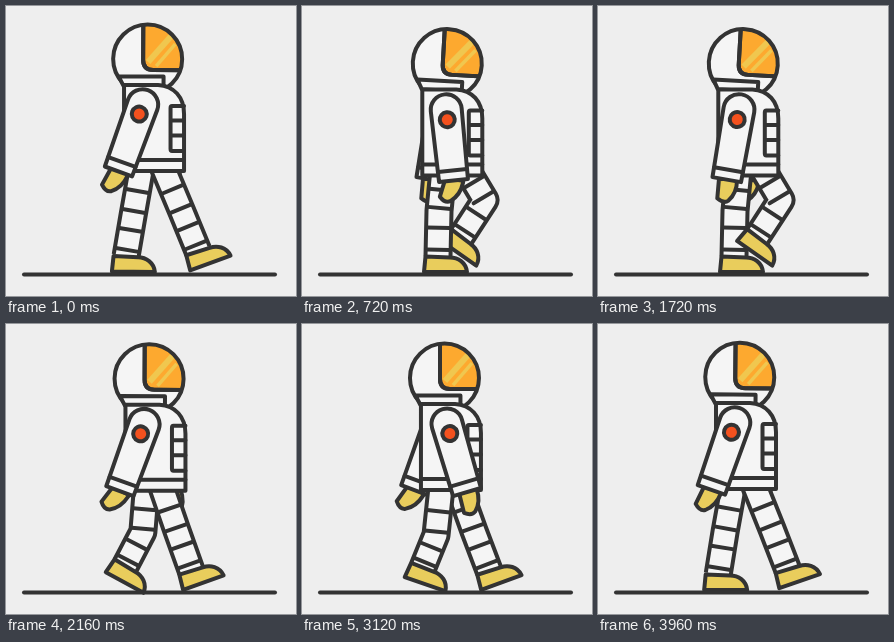
Write an HTML page that moves like this. It is 290x290 px and loops after 4000 ms.

```html
<!DOCTYPE html>
<html lang="en">
<head>
<meta charset="utf-8">
<title>Walking astronaut</title>
<style>
  html, body { margin: 0; width: 100%; height: 100%; overflow: hidden; background: #eee; }
  svg { display: block; width: 100vw; height: 100vh; }
  .line { fill: none; stroke: #333; stroke-width: 4; stroke-linecap: round; stroke-linejoin: round; }
  .suit { fill: #f5f5f5; }
  .yellow { fill: #e9cd5c; }
  .limb { fill: none; stroke-linejoin: round; }
</style>
</head>
<body>
<svg viewBox="0 0 290 290">
  <defs>
    <clipPath id="helmet"><circle cx="141.5" cy="53" r="34.5"/></clipPath>
    <clipPath id="visor"><path d="M137 10H190V64H147Q137 64 137 54Z"/></clipPath>
  </defs>
  <g id="farArm"></g>
  <g id="farLeg"></g>
  <g id="nearLeg"></g>
  <g id="head">
    <circle class="suit" cx="141.5" cy="53" r="34.5"/>
    <g clip-path="url(#helmet)">
      <path class="line" style="fill:#fda92f" d="M137 10H190V64H147Q137 64 137 54Z"/>
      <g clip-path="url(#visor)" fill="none" stroke="#f0c74f">
        <path stroke-width="6" d="M142 56L165 30"/>
        <path stroke-width="3.5" d="M150 60L169 38"/>
      </g>
      <path class="line" d="M137 10V54Q137 64 147 64H190"/>
    </g>
    <circle class="line" cx="141.5" cy="53" r="34.5"/>
    <path class="line suit" d="M112.5 70.5H157.5V80H117.5Z"/>
  </g>
  <g id="body">
    <path class="line suit" d="M118 79H152C168 80 178 91 178 108V165H118Z"/>
    <path class="line" d="M118 154H178M178 100H166Q164.500 100 164.500 102V143Q164.500 145 166 145H178M164.500 114.500H178M164.500 129.500H178"/>
  </g>
  <g id="nearArm"></g>
  <path class="line" d="M18 268.500H269"/>
</svg>
<script>
const LOOP = 4000, STEP = 40, STRIDE = 2000;
const SHOULDER = [140.7, 87.4], HIP = [142, 125];

// time, knee x, knee y, ankle x, ankle y, foot angle
const GAIT = [
  [0, 176, 206, 192, 245, -20],
  [120, 172, 207, 187, 246.5, -20],
  [200, 170, 207, 183, 246.5, -17],
  [330, 165, 208, 175, 250, 0],
  [560, 148, 207, 151.5, 250.5, 0],
  [720, 137, 205, 136, 250.5, 0],
  [980, 127, 208, 120, 250.5, 0],
  [1120, 134, 211, 121, 243, 19],
  [1200, 140, 204, 118, 239.4, 38],
  [1380, 153, 198, 119, 227, 58],
  [1560, 167, 195, 133.6, 225.7, 58],
  [1720, 183, 194, 159.4, 230.3, 35],
  [1850, 183, 199, 184, 240, 3],
  [1960, 174, 205, 189.5, 245, -19]
];

const byId = id => document.getElementById(id);
const wave = turns => Math.cos(2 * Math.PI * turns);
const mix = (a, b, k) => [a[0] + (b[0] - a[0]) * k, a[1] + (b[1] - a[1]) * k];

function gaitKey(i) {
  const n = GAIT.length, lap = Math.floor(i / n);
  const [time, ...pose] = GAIT[i - lap * n];
  return { time: time + lap * STRIDE, pose };
}

// Smooth cyclic interpolation that holds still at turning points.
function gaitAt(time) {
  const t = time % STRIDE;
  const i = GAIT.findLastIndex(key => key[0] <= t);
  const [a, b, c, d] = [-1, 0, 1, 2].map(k => gaitKey(i + k));
  const span = c.time - b.time, u = (t - b.time) / span;
  const tangent = (p, q, r, j) => {
    const before = q.pose[j] - p.pose[j], after = r.pose[j] - q.pose[j];
    return before * after <= 0 ? 0 : (before + after) / (r.time - p.time) * span;
  };
  return b.pose.map((from, j) => {
    const to = c.pose[j];
    const blend = u * u * (3 - 2 * u);
    return from + (to - from) * blend
      + tangent(a, b, c, j) * u * (1 - u) * (1 - u)
      - tangent(b, c, d, j) * u * u * (1 - u);
  });
}

function makeArm(id, badge) {
  const arm = byId(id);
  arm.innerHTML = `
    <path class="line yellow" d="M-8 0L-11 19Q-5 25 0 22Q9 15 10 2V0Z"/>
    <path class="line suit" d="M-15.5 12A15.5 15.5 0 0 1 15.5 12L14.500 83H-14.500Z"/>
    <path class="line" d="M-14.500 73H14.500"/>
    ${badge ? '<circle class="line" style="fill:#f4511e" cy="22" r="7.500"/>' : ''}`;
  const hand = arm.firstElementChild;
  return (time, dx, dy) => {
    const turns = time / STRIDE;
    const swing = -2 - 18.5 * wave(turns - 0.04);
    const wrist = -18 * wave(turns - 0.25);
    arm.setAttribute('transform',
      `translate(${SHOULDER[0] + dx} ${SHOULDER[1] + dy}) rotate(${-swing})`);
    hand.setAttribute('transform', `translate(0 82) rotate(${-wrist})`);
  };
}

function band(from, to, k) {
  const [x, y] = mix(from, to, k);
  const dx = to[0] - from[0], dy = to[1] - from[1];
  const s = 11.5 / Math.hypot(dx, dy);
  return `M${x - dy * s} ${y + dx * s}L${x + dy * s} ${y - dx * s}`;
}

function makeLeg(id) {
  const leg = byId(id);
  leg.innerHTML = `
    <path class="limb" stroke="#333" stroke-width="29"/>
    <path class="limb" stroke="#f5f5f5" stroke-width="21"/>
    <path class="line"/>
    <path class="line yellow" d="M-12.500 0L-14 15.500H29C28 6 20 1 12 1Z"/>`;
  const [outline, fill, bands, boot] = leg.children;
  return (time, dx, dy) => {
    const [kx, ky, ax, ay, angle] = gaitAt(time);
    const hip = [HIP[0] + dx, HIP[1] + dy], knee = [kx, ky], ankle = [ax, ay];
    const path = `M${hip}L${knee}L${ankle}`;
    outline.setAttribute('d', path);
    fill.setAttribute('d', path);
    bands.setAttribute('d', band(knee, hip, 0.28) + band(knee, hip, 0.04)
      + band(knee, ankle, 0.37) + band(knee, ankle, 0.85));
    boot.setAttribute('transform', `translate(${ankle}) rotate(${angle})`);
  };
}

const near = [makeArm('nearArm', true), makeLeg('nearLeg')];
const far = [makeArm('farArm', false), makeLeg('farLeg')];

function draw(elapsed) {
  const time = Math.floor(elapsed % LOOP / STEP) * STEP;
  const step = time / (STRIDE / 2);
  const dx = 2.3 * (1 - wave(step + 0.03));
  const dy = 3.75 * (1 - wave(step));
  const nod = 2 * (1 - wave(step - 0.08));
  byId('body').setAttribute('transform', `translate(${dx} ${dy})`);
  byId('head').setAttribute('transform', `translate(${dx} ${dy}) rotate(${nod} 140 79)`);
  near.forEach(pose => pose(time, dx, dy));
  far.forEach(pose => pose(time + STRIDE / 2, dx, dy));
}

const start = performance.now();
function tick() {
  draw(performance.now() - start);
  requestAnimationFrame(tick);
}
tick();
</script>
</body>
</html>
```
